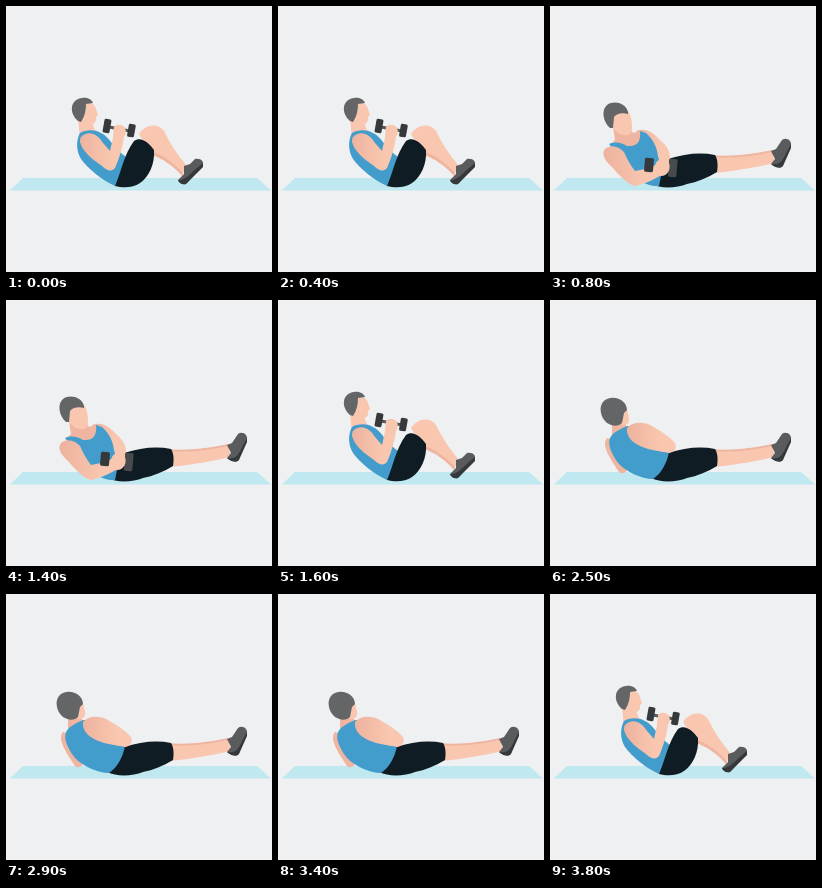
Recreate the animation shown at these times as an HTML page. Size 266 px wide and 266 px high, loop 3.9 s.

```html
<!DOCTYPE html>
<html lang="en">
<head>
<meta charset="utf-8">
<title>Russian twist</title>
<style>
  html, body { margin: 0; width: 100%; height: 100%; overflow: hidden; background: #eff0f2; }
  svg { display: block; width: 100vw; height: 100vh; }
  .mat { fill: #c0e8f1; }
  .skin { fill: #f9c7b0; }
  .shade { fill: #efb5a0; }
  .arm { fill: url(#armTone); }
  .hair { fill: #646567; }
  .top { fill: #429dcc; }
  .shorts { fill: #101c23; }
  .shoe { fill: #5a5b5c; }
  .weight { fill: #35393c; }
  .far { fill: #474b4d; }
  .bar { stroke: #55585b; stroke-width: 3; }
</style>
</head>
<body>
<svg viewBox="0 0 266 266">
  <defs>
    <linearGradient id="armTone">
      <stop offset="0" stop-color="#edb29e"/>
      <stop offset=".7" stop-color="#f9c7b0"/>
    </linearGradient>
    <g id="legs">
      <path class="shade" d="M160 149 C182 151 203 148 222 144 L223 149 L162 156Z"/>
      <path class="skin" d="M161 151 C182 153 203 150 222 146 L225 157 C206 161 186 165 163 167Z"/>
      <path class="shoe" d="M221 145 L226 143 L232 134 C236 131 242 134 241 140 L233 159 C231 163 224 161 221 158 L225 153Z"/>
      <path class="weight" d="M241 138 L241 142 L233 160 C231 163 225 162 221 158 C227 159 231 157 233 153Z"/>
      <path class="shorts" d="M101 178 C108 171 111 159 118 153 C134 148 150 146 165 149 C168 153 168 161 167 166 C157 172 147 176 137 178 C127 182 111 183 101 178Z"/>
    </g>
  </defs>

  <path class="mat" d="M17 172 H251 L265 184.5 H4Z"/>

  <g id="center">
    <path class="skin" d="M133 128 C139 119 151 116 158 125 C164 138 172 149 180 159 L176 170 C168 160 156 152 146 149Z"/>
    <path class="shade" d="M147 146 C157 149 169 158 177 167 L176 170 C168 160 156 152 146 149Z"/>
    <path class="shoe" d="M178 160 L184 158 L189 153 C195 152 199 156 196 160 L180 178 C176 179 173 177 172 174 L178 168Z"/>
    <path class="weight" d="M197 157 L197 161 L180 178 C176 179 173 177 172 174 C180 175 185 166 197 157Z"/>
    <path class="skin" d="M72 113 L85 113 L91 130 L74 134Z"/>
    <path class="skin" d="M76 99 C83 94 89 98 90 103 L92 109 L90 111 C91 117 87 119 82 118 L73 115Z"/>
    <path class="hair" d="M72 115 C62 106 65 93 76 92 C82 91 86 94 87 97 L80 98 C80 104 79 110 75 116Z"/>
    <path class="top" d="M74 127 C79 124 88 123 95 127 C104 131 107 142 120 151 C117 162 114 172 109 180 C96 174 82 163 75 153 C70 145 70 134 74 127Z"/>
    <path class="arm" d="M76 130 C83 124 92 128 97 137 L104 145 L108 127 L118 130 C117 141 113 153 109 162 C106 166 101 165 96 160 C87 154 76 145 74 136 C74 133 74 132 76 130Z"/>
    <path class="shorts" d="M109 180 C115 167 118 148 128 135 C135 130 143 137 148 144 C149 158 143 171 134 177 C127 182 117 182 109 180Z"/>
    <path class="bar" d="M103 121 L124 125"/>
    <rect class="weight" x="97.5" y="113" width="7" height="14" rx="1.5" transform="rotate(10 101 120)"/>
    <rect class="weight" x="122" y="118" width="7" height="13" rx="1.5" transform="rotate(10 125 124)"/>
    <path class="skin" d="M108 121 C111 117 118 119 119 122 C121 127 119 131 115 133 L107 131Z"/>
  </g>

  <g id="front">
    <use href="#legs"/>
    <path class="shade" d="M63 121 L80 122 L83 127 L92 124 L91 142 L70 146 L60 139 L65 134Z"/>
    <path class="skin" d="M60 110 C66 105 73 104 79 106 C82 113 83 122 81 127 C76 132 67 128 62 121Z"/>
    <path class="hair" d="M60 122 C53 116 51 104 57 99 C64 94 76 97 78 106 L78 108 C72 106 66 108 64 111 L63 122Z"/>
    <path class="arm" d="M86 125 C95 121 104 127 109 133 C115 138 120 144 120 151 L119 158 L109 161 L108 149 C104 143 99 137 94 131Z"/>
    <path class="top" d="M59 138 C66 135 72 137 77 140 C88 141 91 135 90 125 L96 127 C104 134 107 142 108 150 L112 165 L109 180 C97 181 86 174 76 160Z"/>
    <path class="arm" d="M55 143 C60 138 69 140 74 146 C77 153 81 160 85 165 L100 162 L109 157 C115 156 118 161 116 166 C107 172 96 178 85 180 C77 178 68 168 62 161 C55 155 51 148 55 143Z"/>
    <rect class="weight" x="94.5" y="152" width="9" height="14" rx="1.5" transform="rotate(5 99 159)"/>
    <rect class="far" x="118.5" y="153" width="8.5" height="18" rx="1.5" transform="rotate(5 123 162)"/>
    <path class="skin" d="M106 157 C109 151 117 153 119 157 C121 163 118 169 112 170 L103 169 L104 162Z"/>
  </g>

  <g id="back">
    <use href="#legs"/>
    <path class="shade" d="M57 138 C62 138 69 150 77 170 C75 174 71 174 69 172 C63 163 57 154 55 146 C55 142 55 140 57 138Z"/>
    <path class="shade" d="M62 118 L75 117 L76 126 L84 130 L62 138Z"/>
    <path class="skin" d="M70 110 L77 109 L79 118 C80 123 76 126 71 125Z"/>
    <path class="hair" d="M57 123 C49 116 48 103 57 99 C66 95 77 101 77 110 L74 113 L72 123 C68 127 62 126 57 123Z"/>
    <path class="top" d="M60 138 C63 132 71 129 77 126 C84 126 91 128 97 137 L119 152 C117 163 111 174 103 179 C91 179 77 172 69 164 C63 156 57 146 60 138Z"/>
    <path class="arm" d="M77 128 C82 122 94 121 102 126 C111 131 120 137 125 143 C127 148 125 152 119 153 C110 151 98 150 90 146 C81 142 76 135 77 128Z"/>
  </g>
</svg>
<script>
  const LOOP = 3900;
  const poses = ["center", "front", "back"].map(id => document.getElementById(id));

  function poseAt(t) {
    if (t >= 500 && t < 1500) return "front";
    if (t >= 2500 && t < 3500) return "back";
    return "center";
  }

  function render(now) {
    const current = poseAt(now % LOOP);
    for (const pose of poses) pose.style.display = pose.id === current ? "" : "none";
  }

  const start = performance.now();
  function tick() {
    render(performance.now() - start);
    requestAnimationFrame(tick);
  }
  tick();
</script>
</body>
</html>
```
